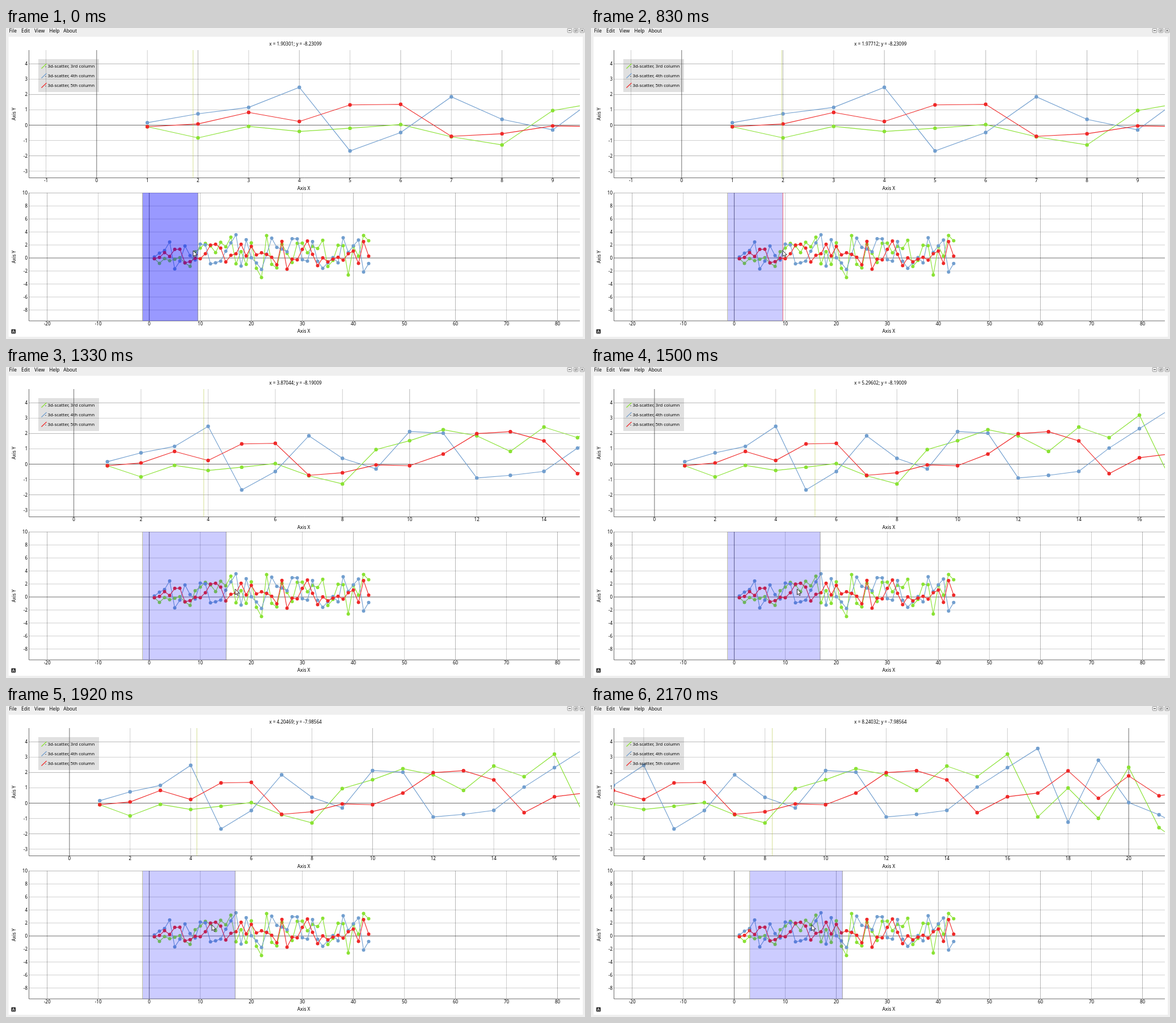
An HTML page with a canvas that plays this animation: 1021x549 px, repeating every 2.26 s.

```html
<!DOCTYPE html>
<html lang="en">
<head>
<meta charset="utf-8">
<title>Linked plots</title>
<style>
html, body { margin: 0; width: 100%; height: 100%; overflow: hidden; background: #efefef; }
canvas { display: block; }
</style>
</head>
<body>
<canvas id="stage" width="1021" height="549"></canvas>
<script>
const ctx = document.getElementById('stage').getContext('2d');
const LOOP = 2260, STEPS_PER_MS = .012, LAST_STEP = 26;
const LEFT = 40.5, RIGHT = 1012;
const HAIR = .58;
const POINTS = 43;

// Key points lead each curve; seeded noise of the given spread fills the rest.
const series = [
  { color: '#8ae234', name: '3rd', spread: 7, y: [
    -.1, -.83, -.08, -.41, -.2, .04, -.76, -1.29, .95, 1.53, 2.25,
    1.85, .83, 2.42, 1.73, 3.2, -.9, .99, -.99, 2.34, -1.6] },
  { color: '#729fcf', name: '4th', spread: 6, y: [
    .16, .74, 1.16, 2.47, -1.68, -.48, 1.85, .38, -.31, 2.13, 2.02,
    -.9, -.73, -.47, 1.05, 2.32, 3.57, -1.24, 2.8, .04, -.76] },
  { color: '#ef2929', name: '5th', spread: 5, y: [
    -.1, .08, .83, .24, 1.32, 1.36, -.73, -.56, -.05, -.1, .66,
    1.99, 2.12, 1.52, -.62, .42, .66, 2.11, .32, 1.78, .48] }
];

let seed = 7;
function random() {
  seed = (seed * 16807) % 2147483647;
  return seed / 2147483647;
}
for (const s of series) {
  while (s.y.length < POINTS) s.y.push(.5 + (random() - .5) * s.spread);
}

// Progress from 0 to 1 between two steps.
const ramp = (step, from, to) => Math.min(1, Math.max(0, (step - from) / (to - from)));

function poseAt(step) {
  const r = (from, to) => ramp(step, from, to);
  const slide = 4.354 * r(23, 26);
  return {
    lo: -1.336 + slide,
    hi: 9.537 + 7.303 * r(10, 17) ** 1.8 + slide,
    x: 1.90301 + .07411 * r(2, 6) + .46774 * r(10, 14) + 2.85116 * r(14, 18)
      - 1.09133 * r(18, 22) + 4.03563 * r(23, 26),
    y: -8.23099 + .0409 * r(10, 13) + .20445 * r(18, 22),
    pointer: 330 + 6.5 * r(2, 6) + 1.5 * r(9, 10) + 66 * r(10, 15.5) - 40.5 * r(16, 18)
      - 16.5 * r(18, 21) + 16 * r(21, 23) + 26 * r(23, 26)
  };
}

function line(x1, y1, x2, y2, color, width = HAIR) {
  ctx.strokeStyle = color;
  ctx.lineWidth = width;
  ctx.beginPath();
  ctx.moveTo(x1, y1);
  ctx.lineTo(x2, y2);
  ctx.stroke();
}

function text(s, x, y, align = 'left', size = 8.05, color = '#000') {
  ctx.font = size + 'px "Noto Sans", "Open Sans", sans-serif';
  ctx.textAlign = align;
  ctx.fillStyle = color;
  ctx.fillText(s, x, y);
}

function box(x, y, w, h, color) {
  ctx.fillStyle = color;
  ctx.fillRect(x, y, w, h);
}

function dot(x, y, radius) {
  ctx.beginPath();
  ctx.arc(x, y, radius, 0, 7);
}

// Three tick levels, coarse to fine, picked from the range and the pixel size.
function ticks(lo, hi, pixels) {
  const ideal = (hi - lo) / Math.log(pixels);
  const unit = 10 ** Math.floor(Math.log10(ideal));
  const steps = [1, 2, 10, 20, 100].map(v => v * unit);
  let fine = 0;
  while (steps[fine + 1] <= ideal) fine++;
  const list = [];
  for (let v = Math.ceil(lo / steps[fine]) * steps[fine]; v <= hi; v += steps[fine]) {
    const level = v % steps[fine + 2] === 0 ? 1 : v % steps[fine + 1] === 0 ? 2 : 3;
    list.push({ v, color: `rgba(0,0,0,${1 / level})` });
  }
  return list;
}

function makePlot(top, bottom, zeroY, unitY, lo, hi, radius) {
  const unitX = (RIGHT - LEFT) / (hi - lo);
  return {
    top, bottom, lo, hi, radius,
    px: v => LEFT + (v - lo) * unitX,
    py: v => zeroY - v * unitY,
    yLo: (zeroY - bottom) / unitY,
    yHi: (zeroY - top) / unitY
  };
}

function vertical(p, v, color) {
  line(p.px(v), p.top, p.px(v), p.bottom, color);
}

function drawAxes(p) {
  for (const { v, color } of ticks(p.lo, p.hi, RIGHT - LEFT)) {
    vertical(p, v, color);
    text(v, p.px(v), p.bottom + 7.8, 'center');
  }
  for (const { v, color } of ticks(p.yLo, p.yHi, p.bottom - p.top)) {
    line(LEFT, p.py(v), RIGHT, p.py(v), color);
    text(v, 38, p.py(v) + 3, 'right');
  }
  vertical(p, p.lo, '#000');
  line(LEFT, p.bottom, RIGHT, p.bottom, '#000');
  text('Axis X', 525, p.bottom + 21, 'center', 8.2);
  ctx.save();
  ctx.translate(17.3, (p.top + p.bottom) / 2);
  ctx.rotate(-Math.PI / 2);
  text('Axis Y', 0, 0, 'center', 8.2);
  ctx.restore();
}

function drawCurves(p) {
  ctx.save();
  ctx.beginPath();
  ctx.rect(LEFT, p.top, RIGHT - LEFT, p.bottom - p.top);
  ctx.clip();
  for (const s of series) {
    ctx.strokeStyle = ctx.fillStyle = s.color;
    ctx.lineWidth = 1.15;
    ctx.beginPath();
    s.y.forEach((v, i) => ctx.lineTo(p.px(i + 1), p.py(v)));
    ctx.stroke();
    s.y.forEach((v, i) => {
      dot(p.px(i + 1), p.py(v), p.radius);
      ctx.fill();
    });
  }
  ctx.restore();
}

function drawLegend() {
  box(57, 55, 107, 58, 'rgba(100,100,100,.2)');
  series.forEach((s, i) => {
    const y = 67.5 + 17 * i;
    line(62.5, y + 4, 71.5, y - 4.5, s.color, 1.2);
    text(`- 3d-scatter, ${s.name} column`, 68.8, y + 2.8, 'left', 7.95);
  });
}

function drawWindow() {
  box(0, 0, 1021, 549, '#efefef');
  box(4.5, 15.5, 1012.5, 529.5, '#fff');
  text('File', 5.5, 7.8, 'left', 8.35);
  text('Edit', 27, 7.8, 'left', 8.35);
  text('View', 50, 7.8, 'left', 8.35);
  text('Help', 76.3, 7.8, 'left', 8.35);
  text('About', 101.3, 7.8, 'left', 8.35);
  ctx.strokeStyle = '#777';
  ctx.lineWidth = .7;
  for (let x = 994; x <= 1016; x += 11) {
    ctx.beginPath();
    ctx.roundRect(x - 3.8, .7, 7.6, 7.4, 1.2);
    ctx.stroke();
  }
  dot(1005, 4.5, 1.9);
  ctx.stroke();
  line(992, 4.5, 996, 4.5, '#333', .9);
  line(1003.3, 6.2, 1006.7, 2.8, '#444', .8);
  line(1014.3, 2.8, 1017.7, 6.2, '#333', .9);
  line(1014.3, 6.2, 1017.7, 2.8, '#333', .9);
}

function drawAutoButton() {
  ctx.fillStyle = '#333';
  ctx.beginPath();
  ctx.roundRect(9.3, 531.8, 7.8, 7.8, 1.3);
  ctx.fill();
  text('A', 13.2, 538.4, 'center', 7.5, '#fff');
}

function drawRegion(p, lo, hi, step) {
  const hovered = step < 5;
  const grabbed = !hovered && step <= 10;
  box(p.px(lo), p.top, p.px(hi) - p.px(lo), p.bottom - p.top,
    `rgba(0,0,255,${hovered ? .4 : .2})`);
  vertical(p, lo, 'rgb(170,170,90)');
  vertical(p, hi, grabbed ? '#f00' : '#665');
}

function drawPointer(x, y) {
  ctx.beginPath();
  [[0, 0], [0, 10.2], [2.4, 8], [4, 11.6], [5.7, 10.8], [4.1, 7.4], [7.3, 7.2]]
    .forEach(([dx, dy]) => ctx.lineTo(x + dx, y + dy));
  ctx.closePath();
  ctx.fillStyle = '#fff';
  ctx.fill();
  ctx.strokeStyle = '#111';
  ctx.lineWidth = .9;
  ctx.stroke();
}

const overview = makePlot(291, 517, 406, 11.48, -23.57, 84.39, 3);

function draw(now) {
  // Half a centisecond of slack absorbs the rounding of step times.
  const step = Math.min(LAST_STEP, Math.floor((now % LOOP + 4) * STEPS_PER_MS));
  const pose = poseAt(step);
  const detail = makePlot(39, 264.5, 171.5, 27.05, pose.lo, pose.hi, 3.2);

  drawWindow();
  text(`x = ${pose.x.toFixed(5)}; y = ${pose.y.toFixed(5)}`, 510.5, 31.2, 'center');

  drawAxes(detail);
  drawCurves(detail);
  vertical(detail, pose.x, 'rgb(180,200,70)');
  drawLegend();

  drawAxes(overview);
  drawCurves(overview);
  drawRegion(overview, pose.lo, pose.hi, step);
  drawAutoButton();
  drawPointer(pose.pointer, detail.py(pose.y) - 1.1);
  requestAnimationFrame(draw);
}
requestAnimationFrame(draw);
</script>
</body>
</html>
```
